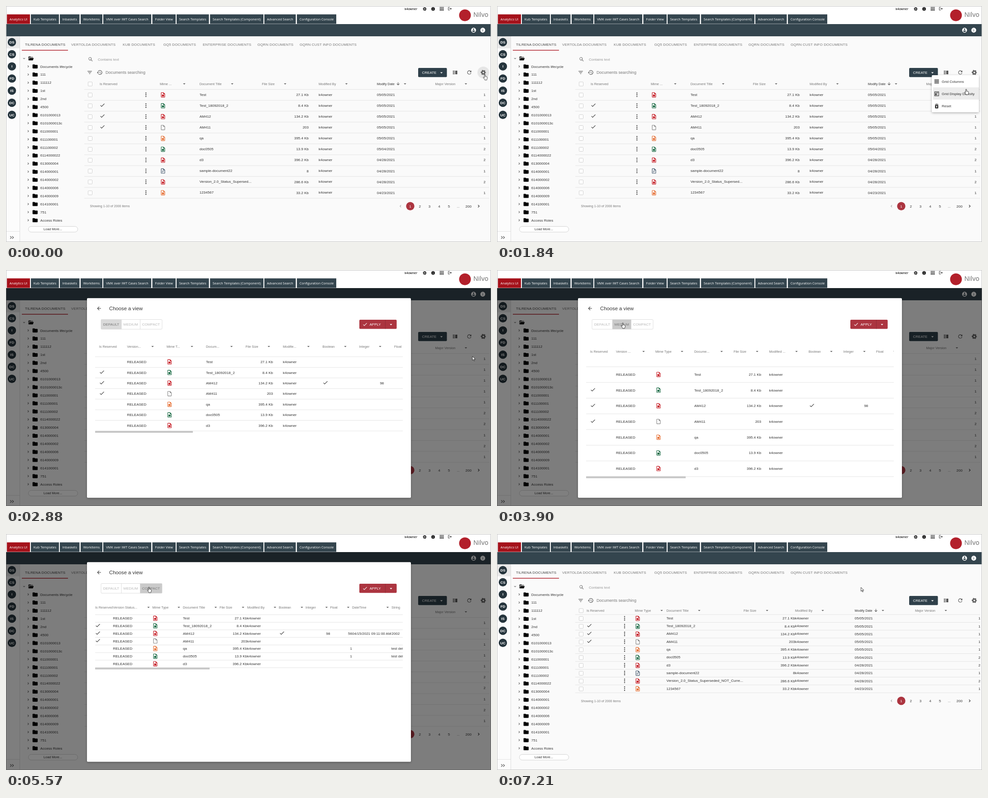
Recreate the animation shown at these times as an HTML page. Size 1072x522 px, loop 8220 ms.

```html
<!DOCTYPE html>
<html lang="en">
<head>
<meta charset="utf-8">
<title>Grid display density</title>
<style>
html, body { margin: 0; width: 100%; height: 100%; overflow: hidden; background: #fff; }
svg { display: block; width: 1072px; height: 522px; }
text { font-family: "Liberation Sans", Arial, sans-serif; white-space: pre; }
.os { font-family: "Open Sans", sans-serif; }
.caps { letter-spacing: .12px; }
</style>
</head>
<body>
<script>
const LOOP = 8220, INK = '#333', SOFT = '#777', SLATE = '#34454e', RED = '#ac3540';
const USER = 'k4owner';
let css = '', html = '';
const add = s => { html += s; };

// Hard-switched keyframes: list of [ms, value].
const steps = (id, prop, list) => {
  const keys = list.map(([t, v]) => `${(t / LOOP * 100).toFixed(4)}%{${prop}:${v}}`).join('');
  css += `@keyframes ${id}{${keys}}#${id}{animation:${id} ${LOOP}ms step-end infinite}\n`;
};
// Visible in the given [from, to] spans.
const show = (id, ...spans) => {
  const list = spans[0][0] ? [[0, 0]] : [];
  for (const [a, b] of spans) {
    list.push([a, 1]);
    if (b < LOOP) list.push([b, 0]);
  }
  steps(id, 'opacity', list);
};

const T = (x, y, s, size = 8, fill = INK, attr = '') =>
  `<text x="${x}" y="${(y + size * .36).toFixed(2)}" font-size="${size}" fill="${fill}" ${attr}>${s}</text>`;
const R = (x, y, w, h, fill, attr = '') =>
  `<rect x="${x}" y="${y}" width="${w}" height="${h}" fill="${fill}" ${attr}/>`;
const C = (x, y, r, fill, attr = '') => `<circle cx="${x}" cy="${y}" r="${r}" fill="${fill}" ${attr}/>`;
const G = (id, s, attr = '') => `<g id="${id}" ${attr}>${s}</g>`;
const MID = 'text-anchor="middle"', END = 'text-anchor="end"';

const PATHS = {
  search: 'M15.5 14h-.8a6.5 6.5 0 1 0-.7.7v.8l5 5 1.5-1.5zM9.5 14a4.5 4.5 0 1 1 0-9 4.5 4.5 0 0 1 0 9z',
  filter: 'M10 18h4v-2h-4zM3 6v2h18V6zM6 13h12v-2H6z',
  history: 'M13 3a9 9 0 0 0-9 9H1l3.9 3.9L9 12H6a7 7 0 1 1 2 4.9l-1.4 1.4A9 9 0 1 0 13 3zM12 8v5l4.3 2.5.7-1.2-3.5-2.1V8z',
  folder: 'M10 4H4a2 2 0 0 0-2 2v12a2 2 0 0 0 2 2h16a2 2 0 0 0 2-2V8a2 2 0 0 0-2-2h-8z',
  open: 'M19 20H4a2 2 0 0 1-2-2V6a2 2 0 0 1 2-2h6l2 2h7a2 2 0 0 1 2 2H4v10l2.1-8h17.1l-2.3 8.5a2 2 0 0 1-1.9 1.5z',
  right: 'M10 6L8.6 7.4l4.6 4.6-4.6 4.6L10 18l6-6z',
  left: 'M14 6l1.4 1.4-4.6 4.6 4.6 4.6L14 18l-6-6z',
  down: 'M6 10l1.4-1.4 4.6 4.6 4.6-4.6L18 10l-6 6z',
  twice: 'M5 6L3.6 7.4 8.2 12l-4.6 4.6L5 18l6-6zM13 6l-1.4 1.4 4.6 4.6-4.6 4.6L13 18l6-6z',
  check: 'M9 16.2L4.8 12l-1.4 1.4L9 19 21 7l-1.4-1.4z',
  drop: 'M7 10l5 5 5-5z',
  back: 'M20 11H7.8l5.6-5.6L12 4l-8 8 8 8 1.4-1.4L7.8 13H20z',
  sort: 'M11 4v12.2l-5.6-5.6L4 12l8 8 8-8-1.4-1.4-5.6 5.6V4z',
  refresh: 'M17.65 6.35A8 8 0 1 0 19.73 14h-2.08A6 6 0 1 1 16.22 7.78L13 11h7V4z',
  info: 'M12 2a10 10 0 1 0 0 20 10 10 0 0 0 0-20zM13 17h-2v-6h2zM13 9h-2V7h2z',
  account: 'M12 2a10 10 0 1 0 0 20 10 10 0 0 0 0-20zM12 5a3 3 0 1 1 0 6 3 3 0 0 1 0-6zM12 19.2a7.2 7.2 0 0 1-6-3.2c0-2 4-3.1 6-3.1s6 1.1 6 3.1a7.2 7.2 0 0 1-6 3.2z',
  logout: 'M17 7l-1.4 1.4 2.6 2.6H8v2h10.2l-2.6 2.6L17 17l5-5zM4 5h8V3H4a2 2 0 0 0-2 2v14a2 2 0 0 0 2 2h8v-2H4z',
  apps: [3, 10, 17].map(y => [2, 9.5, 17].map(x => `M${x} ${y}h5v5h-5z`).join('')).join(''),
  list: 'M2 4h9v2.5H2zM2 8.5h9V11H2zM2 13h9v2.5H2zM2 17.5h9V20H2zM13 4h9v16h-9z',
  rows: 'M2 3h20v2.5H2zM2 8h20v2.5H2zM2 13h20v2.5H2zM2 18h20v2.5H2z',
  density: 'M2 2h20v20H2zM4 4v16h16V4zM6 6h2.5v2H6zM10 6h8v2h-8zM6 10h5v8H6zM13 10h2v2h-2zM13 13h2v2h-2zM13 16h2v2h-2z',
  reset: 'M19 3h-3.5l-1-1h-5l-1 1H5v2h14zM5 7v13a2 2 0 0 0 2 2h10a2 2 0 0 0 2-2V7zM14 14v4h-4v-4H8l4-4 4 4z',
  file: 'M14 2H6a2 2 0 0 0-2 2v16a2 2 0 0 0 2 2h12a2 2 0 0 0 2-2V8zM18 20H6V4h7v5h5z'
};
const I = (name, x, y, size, fill = INK, extra = '') =>
  `<path d="${PATHS[name]}${extra}" fill="${fill}" fill-rule="evenodd" transform="translate(${x - size / 2} ${y - size / 2}) scale(${size / 24})"/>`;
const gear = (x, y, size, fill) =>
  `<g transform="translate(${x} ${y}) scale(${size / 24})" fill="none" stroke="${fill}">` +
  `<circle r="5.7" stroke-width="4.5"/><circle r="8.6" stroke-width="3" stroke-dasharray="4.5 4.506" stroke-dashoffset="2.25"/></g>`;
const MARK = 'M8 11h8v7H8z', LINES = 'M8 11h8v2H8zM8 15h5v2H8z';
const KINDS = {
  pdf: ['#c4161f', MARK], xls: ['#13663f', MARK], ppt: ['#e5692b', MARK],
  doc: ['#42566b', LINES], any: ['#858585', '']
};
const fileIcon = (kind, x, y) => I('file', x, y, 13.5, ...KINDS[kind]);
const pick = y => R(181.5, y - 4.5, 9, 9, '#fff', 'rx="1" stroke="#cfcfcf"');
const rule = (x, y, w) => R(x, y, w, .8, '#dedede');

const ROWS = [
  [0, 'pdf', 'Test', '27.1 Kb', '05/05/2021', 1],
  [1, 'xls', 'Test_18092018_2', '8.4 Kb', '05/05/2021', 1],
  [1, 'pdf', 'AM412', '134.2 Kb', '05/05/2021', 1],
  [1, 'any', 'AM411', '203', '05/05/2021', 1],
  [0, 'ppt', 'qa', '395.4 Kb', '05/05/2021', 1],
  [0, 'xls', 'doc0505', '13.9 Kb', '05/04/2021', 2],
  [0, 'pdf', 'd3', '396.2 Kb', '04/28/2021', 2],
  [0, 'doc', 'sample-document22', '8', '04/28/2021', 1],
  [0, 'pdf', 'Version_2.0_Status_Supersed...', '286.6 Kb', '04/28/2021', 2],
  [0, 'ppt', '1234567', '33.2 Kb', '04/23/2021', 1]
];
// heads: [label, x, arrow x]
const headRow = (heads, y) => heads.map(([s, x, arrow]) =>
  T(x, y, s, 7.35, s == 'Modify Date' ? INK : SOFT) + (arrow ? I('drop', arrow, y, 13, '#666') : '')).join('');

const mainGrid = c => {
  let s = pick(c.head + .5) + headRow(c.heads, c.head) + I('sort', c.date + 47, c.head, 10) + rule(173, c.y - c.step / 2, 895);
  ROWS.forEach(([held, kind, title, size, date, ver], i) => {
    const y = c.y + i * c.step;
    s += pick(y + .5);
    if (held) s += I('check', c.tick, y - 1.2, 13);
    for (const d of [-3.8, 0, 3.8]) s += C(c.dots, y + d, 1.2, '#444');
    s += fileIcon(kind, c.icon, y + .3) + T(c.title, y - .4, i == 8 ? c.long : title) +
      T(c.size, y, size, 8, INK, END) + T(c.user, y - .4, USER) + T(c.date, y, date) +
      T(c.ver, y, ver, 8, INK, END) + rule(173, y + c.step / 2, 895);
  });
  const p = c.pager;
  s += T(185.5, p, 'Showing 1-10 of 2000 items', 7.1, SOFT) + I('left', 872, p, 11, '#999') +
    C(893.5, p, 9.2, RED) + T(893.5, p, 1, 8, '#fff', MID);
  [2, 3, 4, 5].forEach((n, i) => { s += T(914.7 + i * 21.4, p, n, 8, INK, MID); });
  return s + T(999.5, p, '...', 8, SOFT, MID) + T(1022.3, p, 200, 8, INK, MID) + I('right', 1044.7, p, 12, '#111');
};

// Page header
add(R(0, 0, 1072, 522, '#fafafa') + R(0, 0, 1072, 40, '#fff'));
[['Analytics UI', 2, 53], ['Kub Templates', 55, 117], ['Inbaskets', 119, 162.5], ['Workitems', 165, 213],
 ['VMK over IWT Cases Search', 215, 321], ['Folder View', 323.5, 375], ['Search Templates', 377, 448.5],
 ['Search Templates (Component)', 451, 569], ['Advanced Search', 571, 640.5], ['Configuration Console', 643, 730]
].forEach(([s, a, b], i) => add(R(a, 18.5, b - a, 21, i ? SLATE : '#a5121b') +
  T((a + b) / 2, 29, s, 7.3, '#fff', MID + ' class="os"')));
add(T(881, 6.5, USER, 6.7, '#222', 'class="os" font-weight="600"') + gear(925.5, 6.5, 9.5, '#222') +
  I('info', 944, 6.5, 9.5, '#222') + I('apps', 963, 6, 10, '#222') + I('logout', 981, 6, 9.5, '#222') +
  C(1014.5, 20.5, 13, '#b3202b') + T(1033, 19, 'Nilvo', 14, '#666', 'class="os"') +
  R(0, 40, 1072, 27, SLATE) + I('account', 1033.5, 53.5, 13, '#fff') + I('info', 1053.8, 53.5, 13, '#fff'));

// Side rail
add(R(0, 67, 30, 455, '#fcfcfc') + R(0, 67, 30, 26.5, '#e9e9e9') + R(30, 67, 1, 455, '#dcdcdc') + R(0, 498, 30, 1, '#e2e2e2'));
['DS', 'CS', 'I', 'FD', 'IS', 'DC', 'UC'].forEach((s, i) => {
  const y = 80 + i * 26.8;
  add(C(13, y, 9.2, '#26353d') + T(13, y, s, 8, '#fff', MID + ' font-weight="bold"'));
});
add(I('twice', 13.5, 512, 13, '#444'));

// Document tabs
[['TILRENA', 42], ['VERTOLDA', 144], ['KUB', 258], ['GQ5', 347.7], ['ENTERPRISE', 435], ['GQRN', 555.7], ['GQRN CUST INFO', 649]
].forEach(([s, x], i) => add(T(x, 85, s + ' DOCUMENTS', 8, i ? SOFT : '#444', 'class="caps"')));
add(R(35, 97, 102, 1.6, '#b5333d'));

// Folder tree
add(I('down', 40, 116, 9) + I('open', 55, 116, 13, '#000'));
['Documents lifecycle', '111', '111112', '1st', '2nd', '4500', '6101000013', '6101000013c', '611000001', '611100001',
 '611100002', '6114000022', '613000004', '614000001', '614000002', '614000006', '614000009', '614100001', '751', 'Access Roles'
].forEach((s, i) => {
  const y = 133.7 + i * 17.9;
  add(I('right', 49, y, 9.5) + I('folder', 64.3, y, 13.5, '#000') + T(75.8, y, s));
});
add(R(49.5, 487.5, 109, 12.5, '#fff', 'rx="6.2" stroke="#c8c8c8" stroke-width=".8"') + T(103.5, 493.5, 'Load More...', 7.3, INK, MID));

// Toolbar
add(I('search', 187, 118, 13, '#777') + T(203, 118, 'Contains text', 8, '#999') + I('filter', 185, 147, 13, '#444') +
  I('history', 207, 147, 13.5, '#555') + T(220, 147, 'Documents searching', 9.1, SOFT) +
  R(911, 137, 63.5, 20.2, '#2f404a', 'rx="2"') + T(919.5, 147.2, 'CREATE', 8, '#fff') + I('drop', 962.5, 147.5, 13, '#fff') +
  I('list', 992.5, 147, 12, '#555') + I('refresh', 1024, 147, 13.5, '#555') +
  G('glow', C(1055, 147, 13, '#e6e6e6')) + gear(1055, 147, 13.5, '#555'));

// Result grids
add(G('roomy', mainGrid({
  head: 172, y: 196.3, step: 24.05, tick: 213, dots: 309.3, icon: 347, title: 427.7, size: 669, user: 691, date: 819.7, ver: 1060,
  long: ROWS[8][2], pager: 442.8,
  heads: [['Is Reserved', 207], ['Mime ...', 340, 394], ['Document Title', 427.7, 500], ['File Size', 565.7, 617],
    ['Modified By', 691, 752.5], ['Modify Date', 819.7, 882], ['Major Version', 948.5, 1016.5]]
})) + G('tight', mainGrid({
  head: 169, y: 186.4, step: 17.3, tick: 204, dots: 282, icon: 311, title: 374.5, size: 658.7, user: 658.7, date: 790.5, ver: 1068.5,
  long: 'Version_2.0_Status_Superseded_NOT_Curre...', pager: 369,
  heads: [['Is Reserved', 198], ['Mime Type', 304.5, 364], ['Document Title', 374.5, 447], ['File Size', 545, 597],
    ['Modified By', 658.7, 720], ['Modify Date', 790.5, 853], ['Major Version', 924, 992]]
})));
add('<path d="M.5.5h1071v521H.5z" fill="none" stroke="#c4c4c4"/>');

// Settings menu
add(G('menu', R(961, 153, 104, 82, '#fff', 'rx="2" filter="url(#shade)"') +
  G('over1', R(961, 153, 104, 27, '#ececec')) + G('over2', R(964, 180, 101, 27, '#ececec')) + G('press', R(964.5, 180, 100.5, 27, '#bdbdbd')) +
  [['rows', 'Grid Columns'], ['density', 'Grid Display Density'], ['reset', 'Reset']].map(([icon, s], i) =>
    I(icon, 971.8, 167 + i * 27.2, 12, '#222') + T(983, 167 + i * 27.2, s)).join('')));

// Dialog
const view = (id, c) => {
  const [a, b] = [[210, 255], [255, 296.5], [296.5, 345]][c.mode];
  let s = R(a, 109.5, b - a, 21.5, '#dadada') + headRow(c.heads, c.head) + rule(197, c.y - c.step / 2, 680);
  ROWS.slice(0, 7).forEach(([held, kind, title, size], i) => {
    const y = c.y + i * c.step;
    if (held) s += I('check', c.tick, y - 1, 13);
    s += T(c.heads[1][1], y, 'RELEASED') + fileIcon(kind, c.icon, y) + T(c.heads[3][1], y, title) +
      T(c.size, y, size, 8, INK, END) + T(c.heads[5][1], y, USER) + rule(197, y + c.step / 2, 680);
    if (i == 2) s += I('check', c.bool, y - 1, 13) + T(c.num, y, 98, 8, INK, END);
  });
  s += c.more || '';
  return G(id, s + R(197, c.bar, c.thumb, 4, '#c6c6c6', 'rx=".5"'), 'clip-path="url(#pane)"');
};
const rowY = i => 186.4 + i * 16.77;
const MODES = [['DEFAULT', 232.5], ['MEDIUM', 275.7], ['COMPACT', 320.5]];
add(G('dialog', R(0, 40, 1072, 482, '#000', 'opacity=".5"') + R(179, 62.3, 716, 441.5, '#fff', 'rx="2" filter="url(#shade)"') +
  I('back', 205.7, 85, 12.5) + T(228, 84.8, 'Choose a view', 11.3) +
  view('wide', {
    mode: 0, head: 169, y: 203.2, step: 23.45, tick: 212, icon: 361.5, size: 590, bool: 706, num: 835.3, bar: 356, thumb: 216,
    heads: [['Is Reserved', 205.7], ['Version...', 267.5, 324], ['Mime T...', 355, 411], ['Docum...', 442, 498.5], ['File Size', 529.5, 581],
      ['Modifie...', 612, 668.5], ['Boolean', 699.5, 750], ['Integer', 780.5, 827], ['Float', 858]]
  }) +
  view('medium', {
    mode: 1, head: 180, y: 231, step: 34.7, tick: 212, icon: 357, size: 584, bool: 696, num: 820.3, bar: 456.5, thumb: 220,
    heads: [['Is Reserved', 205.7], ['Version ...', 263, 324], ['Mime Type', 350, 409], ['Docume...', 436, 496.5], ['File Size', 523, 575],
      ['Modified ...', 601.5, 662], ['Boolean', 688.7, 739], ['Integer', 765.5, 812], ['Float', 838, 878.5]]
  }) +
  view('compact', {
    mode: 2, head: 162, y: 186.4, step: 16.77, tick: 203, icon: 330, size: 533, bool: 610, num: 716.5, bar: 295.5, thumb: 253,
    heads: [['Is Reserved', 197], ['Version Status...', 236.5, 315], ['Mime Type', 323.5, 382], ['Document Title', 391, 463.5], ['File Size', 472, 524],
      ['Modified By', 533, 594.5], ['Boolean', 603, 654], ['Integer', 662, 708.5], ['Float', 716.5, 756.5], ['DateTime', 765, 843.5], ['String', 852]],
    more: T(765, rowY(2), 56, 8, INK, END) + T(765, rowY(2), '04/15/2021 09:11:00 AM') + T(852.3, rowY(2), 2002) +
      [4, 5].map(i => T(765, rowY(i), 1, 8, INK, END) + T(851.7, rowY(i), 'test default')).join('')
  }) +
  G('overMedium', R(255, 109.5, 41.5, 21.5, '#000', 'opacity=".07"')) +
  G('overCompact', R(296.5, 109.5, 48.5, 21.5, '#000', 'opacity=".07"')) +
  R(210, 109.5, 135, 21.5, 'none', 'rx="2" stroke="#d6d6d6" stroke-width=".8"') +
  R(254.7, 109.5, .8, 21.5, '#d6d6d6') + R(296.2, 109.5, .8, 21.5, '#d6d6d6') +
  MODES.map(([s, x], i) => T(x, 120.3, s, 8, '#b9b9b9', MID) + G('on' + i, T(x, 120.3, s, 8, '#828282', MID))).join('') +
  R(781, 110, 82.5, 20.3, RED, 'rx="2"') +
  G('overApply', R(781, 110, 57.5, 20.3, '#852a34', 'rx="2"')) +
  G('ripple', C(805, 120, 26, '#fff', 'opacity=".22" clip-path="url(#apply)"')) +
  R(838, 110, .8, 20.3, '#8a2a34') + I('check', 793.5, 120.2, 12, '#fff') + T(803.5, 120.3, 'APPLY', 8, '#fff') + I('drop', 851, 120.5, 13, '#fff')));

// Pointer
add(G('pointer', '<g fill="#fff" stroke="#111" stroke-width=".8" stroke-linejoin="round">' +
  G('arrow', '<path d="M0 0v8.7l2-1.9 1.5 3.4 1.4-.6-1.5-3.3h2.8z"/>') +
  G('hand', '<path d="M-1 1a1 1 0 0 1 2 0v3.4l3.4.7c.8.2 1.2.8 1.1 1.6l-.5 2.6c-.1.8-.5 1.3-.8 1.9v1H-.2v-.9L-3.3 7.6c-.9-1.2.4-2 1.2-1.2L-1 7.3z"/>') + '</g>'));

show('glow', [0, 1240]);
show('roomy', [0, 7210]);
show('tight', [7210, LOOP]);
show('menu', [850, 2880]);
show('over1', [1430, 1830]);
show('over2', [1830, 2690]);
show('press', [2690, 2880]);
show('dialog', [2880, 7210]);
show('wide', [2880, 3900]);
show('medium', [3900, 5170]);
show('compact', [5170, LOOP]);
show('on0', [2880, 3900]);
show('on1', [3900, 5170]);
show('on2', [5170, LOOP]);
show('overMedium', [3280, 4330]);
show('overCompact', [4550, 6220]);
show('overApply', [6840, LOOP]);
show('ripple', [7050, LOOP]);
const hands = [[0, 850], [1430, 2880], [3280, 6220], [6840, 7210]];
show('hand', ...hands);
show('arrow', ...hands.map(([, end], i) => [end, hands[i + 1] ? hands[i + 1][0] : LOOP]));
steps('pointer', 'transform', [
  [0, 1058.5, 151.5], [850, 1056.5, 150.5], [1430, 1052, 160], [1630, 1045, 172], [1830, 1037, 184], [2040, 1033, 189], [2240, 1031, 191],
  [3080, 640, 150], [3280, 278, 117], [4330, 297, 117], [4550, 316, 117.5], [6010, 330, 119], [6220, 430, 124],
  [6430, 590, 127], [6640, 720, 123], [6840, 804.5, 118]
].map(([t, x, y]) => [t, `translate(${x}px,${y}px)`]));

const sheet = document.createElement('style');
sheet.textContent = css;
document.head.append(sheet);
document.body.innerHTML = `<svg width="1072" height="522"><defs>
<filter id="shade" x="-10%" y="-10%" width="120%" height="125%"><feDropShadow dx="0" dy="1.5" stdDeviation="2.5" flood-opacity=".3"/></filter>
<clipPath id="pane"><rect x="197" y="100" width="680" height="390"/></clipPath>
<clipPath id="apply"><rect x="781" y="110" width="57.5" height="20.3"/></clipPath></defs>${html}</svg>`;
</script>
</body>
</html>
```
